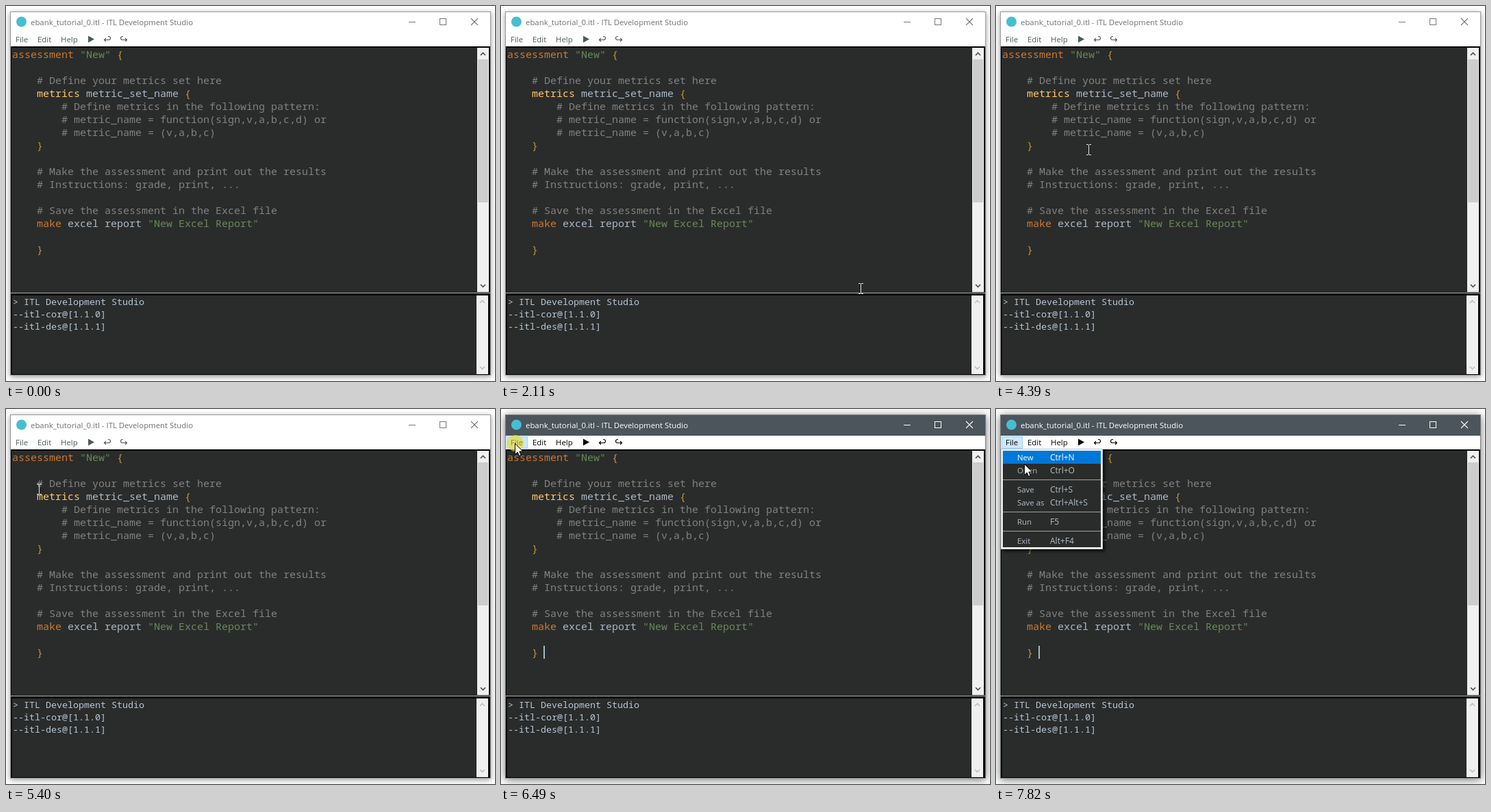
An HTML page with a canvas that plays this animation: 714 by 548 pixels, repeating every 7.99 s.

```html
<!DOCTYPE html>
<html lang="en">
<head>
<meta charset="utf-8">
<title>Editor tutorial</title>
<style>
  html, body { margin: 0; width: 100%; height: 100%; overflow: hidden; background: #fff; }
  canvas { display: block; }
</style>
</head>
<body>
<canvas id="stage" width="714" height="548"></canvas>
<script>
const ctx = document.getElementById('stage').getContext('2d');
const LOOP = 7990;
const CLICK = 6490, MENU_OPEN = 6580, CLICK_END = 6730;
const UI = '11.4px "Open Sans", sans-serif';
const CODE = '15px "Noto Sans Mono", monospace';
const CONSOLE = '13.33px "Noto Sans Mono", monospace';
const DARK = '#2a2c2b';
const KEY = '#cc7832', NAME = '#a9b7c6', STR = '#6a8759', NOTE = '#808080', GOLD = '#ffc66d', BRACE = '#c8923a';

// Each entry: line number, first column, then text and colour pairs.
const code = [
  [0, 0, 'assessment ', KEY, '"New" ', STR, '{', BRACE],
  [2, 4, '# Define your metrics set here', NOTE],
  [3, 4, 'metrics ', GOLD, 'metric_set_name ', NAME, '{', BRACE],
  [4, 8, '# Define metrics in the following pattern:', NOTE],
  [5, 8, '# metric_name = function(sign,v,a,b,c,d) or', NOTE],
  [6, 8, '# metric_name = (v,a,b,c)', NOTE],
  [7, 4, '}', BRACE],
  [9, 4, '# Make the assessment and print out the results', NOTE],
  [10, 4, '# Instructions: grade, print, ...', NOTE],
  [12, 4, '# Save the assessment in the Excel file', NOTE],
  [13, 4, 'make ', KEY, 'excel report ', NAME, '"New Excel Report"', STR],
  [15, 4, '}', BRACE],
];
const menuItems = [
  [71, 'New', 'Ctrl+N'], [90, 'Open', 'Ctrl+O'], [118, 'Save', 'Ctrl+S'],
  [137, 'Save as', 'Ctrl+Alt+S'], [165, 'Run', 'F5'], [193, 'Exit', 'Alt+F4'],
];

const easeIn = p => p ** 1.2;
const easeOut = p => 1 - (1 - p) ** 1.6;
const smooth = p => p * p * (3 - 2 * p);

// Pointer moves: first step time, last step time, steps, end point, easing.
const moves = [
  [1300, 2000, 10, 528, 417, p => 1 - (1 - p) ** 1.15],
  [2110, 2110, 1, 525, 413, smooth],
  [2460, 3380, 13, 240, 264, smooth],
  [3700, 4470, 11, 107, 195, easeIn],
  [4550, 4780, 4, 62, 148, easeOut],
  [5100, 5850, 11, 25, 69, easeIn],
  [5930, 6320, 6, 20, 50, easeOut],
  [7430, 7820, 6, 41, 80, smooth],
];

function pointerAt(t) {
  let x = 683, y = 557;
  for (const [start, end, steps, toX, toY, ease] of moves) {
    if (t < start) break;
    const interval = (end - start) / (steps - 1) || 1;
    const step = Math.min(steps, Math.floor((t - start) / interval + 0.02) + 1);
    const p = ease(step / steps);
    x += (toX - x) * p;
    y += (toY - y) * p;
  }
  return [Math.round(x), Math.round(y)];
}

function rect(color, x, y, w, h) {
  ctx.fillStyle = color;
  ctx.fillRect(x, y, w, h);
}

function text(str, x, y, color, font) {
  ctx.font = font;
  ctx.fillStyle = color;
  ctx.fillText(str, x, y);
}

function line(color, width, ...points) {
  ctx.strokeStyle = color;
  ctx.lineWidth = width;
  ctx.beginPath();
  for (let i = 0; i < points.length; i += 2) ctx.lineTo(points[i], points[i + 1]);
  ctx.stroke();
}

function disc(color, x, y, r) {
  ctx.fillStyle = color;
  ctx.beginPath();
  ctx.arc(x, y, r, 0, 7);
  ctx.fill();
}

function hookArrow(cx, dir, color) {
  ctx.save();
  ctx.translate(cx, 48.5);
  ctx.scale(dir, 1);
  ctx.strokeStyle = color;
  ctx.lineWidth = 1.2;
  ctx.beginPath();
  ctx.moveTo(-4.5, 1);
  ctx.lineTo(2, 1);
  ctx.arc(2, -1.5, 2.5, Math.PI / 2, -Math.PI / 2, true);
  ctx.lineTo(1, -4);
  ctx.moveTo(-2, -1.5);
  ctx.lineTo(-4.5, 1);
  ctx.lineTo(-2, 3.5);
  ctx.stroke();
  ctx.restore();
}

function drawFrame(active) {
  rect('#fff', 0, 0, 714, 548);
  ctx.save();
  ctx.shadowColor = active ? 'rgba(0,0,0,.55)' : 'rgba(0,0,0,.4)';
  ctx.shadowBlur = active ? 12 : 8;
  ctx.shadowOffsetY = 2;
  rect(active ? '#7a7f82' : '#999', 6, 8, 702, 532);
  ctx.restore();

  rect(active ? '#4b555b' : '#fff', 7, 9, 700, 30);
  disc('#45bfd0', 22.5, 23, 7.5);
  text('ebank_tutorial_0.itl - ITL Development Studio', 36, 28, active ? '#fff' : '#707070', UI);
  const control = active ? '#fff' : '#777';
  line(control, 1, 588, 23.5, 598, 23.5);
  ctx.strokeRect(633.5, 18.5, 9, 9);
  line(control, 1.1, 679, 18, 689, 28);
  line(control, 1.1, 689, 18, 679, 28);
}

function drawMenuBar(active) {
  const ink = active ? '#000' : '#4b5c54';
  rect('#fff', 7, 39, 700, 20);
  if (active) {
    rect('#99d1ff', 8, 40, 31, 18);
    rect('#cce8ff', 9, 41, 29, 16);
  }
  text('File', 14, 53, ink, UI);
  text('Edit', 46, 53, ink, UI);
  text('Help', 80, 53, ink, UI);
  ctx.beginPath();
  ctx.moveTo(120, 43.5);
  ctx.lineTo(129, 48.5);
  ctx.lineTo(120, 53.5);
  ctx.fill();
  hookArrow(148, 1, ink);
  hookArrow(172, -1, ink);
}

function scrollbar(x, top, bottom, arrowColor) {
  rect('#f0f0f0', x, top, 17, bottom - top);
  const cx = x + 8.5;
  line(arrowColor, 1.7, cx - 3.5, top + 11, cx, top + 7.5, cx + 3.5, top + 11);
  line(arrowColor, 1.7, cx - 3.5, bottom - 11, cx, bottom - 7.5, cx + 3.5, bottom - 11);
}

function drawPanes() {
  rect('#000', 7, 59, 700, 480);
  rect(DARK, 8, 61, 680, 357);
  scrollbar(688, 61, 418, '#505050');
  rect('#cdcdcd', 689, 78, 15, 209);
  rect(DARK, 7, 418, 700, 1);
  rect('#b4b4b4', 7, 419, 700, 1);
  rect(DARK, 9, 423, 678, 115);
  scrollbar(687, 423, 538, '#bfbfbf');

  for (const [row, column, ...parts] of code) {
    let x = 9 + column * 9;
    for (let i = 0; i < parts.length; i += 2) {
      text(parts[i], x, 76 + row * 19, parts[i + 1], CODE);
      x += parts[i].length * 9;
    }
  }
  ['> ITL Development Studio', '--itl-cor@[1.1.0]', '--itl-des@[1.1.1]']
    .forEach((str, i) => text(str, 10, 437 + i * 18, '#b6c6d6', CONSOLE));
}

function drawMenu(hoverNew) {
  ctx.save();
  ctx.shadowColor = 'rgba(0,0,0,.7)';
  ctx.shadowBlur = 4;
  ctx.shadowOffsetX = ctx.shadowOffsetY = 3;
  rect('#ccc', 7, 58, 149, 147);
  ctx.restore();
  rect('#f2f2f2', 8, 59, 147, 145);
  rect(DARK, 10, 61, 143, 141);
  if (hoverNew) rect('#0078d7', 10, 61, 143, 19);
  for (const y of [103, 150, 178]) rect('#a0a0a0', 10, y, 143, 1);
  menuItems.forEach(([y, label, shortcut], i) => {
    const color = hoverNew && i === 0 ? '#fff' : '#b4bec8';
    text(label, 31, y + 4, color, UI);
    text(shortcut, 79, y + 4, color, '12px "Open Sans", sans-serif');
  });
}

function drawBeam(x, y) {
  const color = '#e4e4e4';
  rect(color, x, y - 7, 1, 14);
  for (const edge of [y - 8, y + 7]) {
    rect(color, x - 3, edge, 3, 1);
    rect(color, x + 1, edge, 3, 1);
  }
}

function drawArrow(x, y) {
  ctx.save();
  ctx.translate(x + 0.5, y + 0.5);
  const shape = new Path2D('M0 0V16L3.7 12.5L6.2 18L8.7 17L6.3 11.5H11.5Z');
  ctx.fillStyle = '#fff';
  ctx.fill(shape);
  ctx.strokeStyle = '#000';
  ctx.lineWidth = 1;
  ctx.stroke(shape);
  ctx.restore();
}

function draw(t) {
  const active = t >= CLICK;
  const [x, y] = pointerAt(t);
  drawFrame(active);
  drawMenuBar(active);
  drawPanes();
  if (active && (t < 7110 || t >= 7430)) rect(NAME, 62, 346, 2, 19);
  if (t >= MENU_OPEN) drawMenu(y > 60);
  if (active && t < CLICK_END) {
    disc(`rgba(232,216,40,${t < 6650 ? 0.65 : 0.35})`, 21, 50, 12);
  }
  if (t >= 1300) (y < 60 || active ? drawArrow : drawBeam)(x, y);
}

function tick() {
  draw(performance.now() % LOOP);
  requestAnimationFrame(tick);
}
tick();
</script>
</body>
</html>
```
